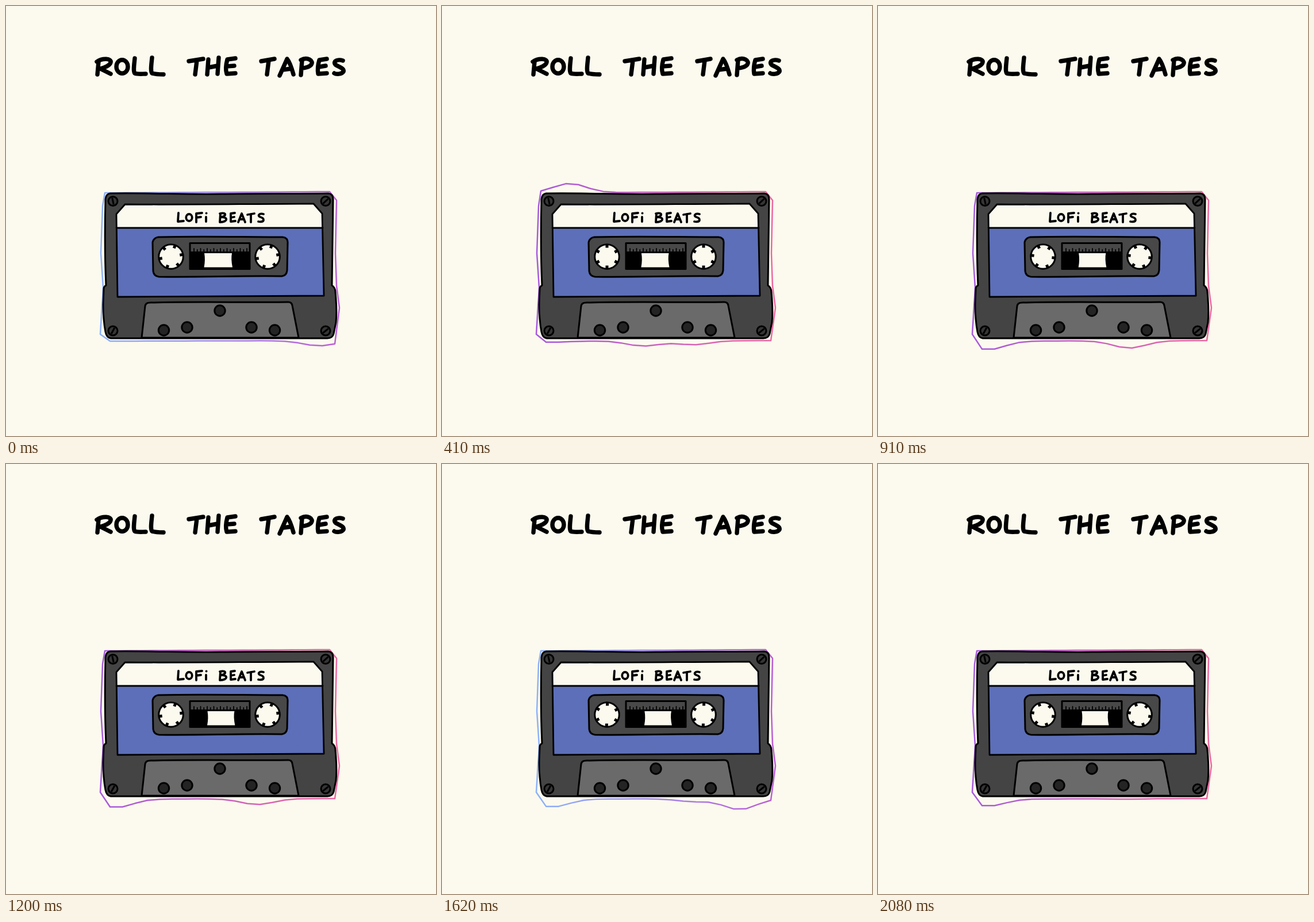
Write an HTML page that moves like this. It is 748x748 px and loops after 2.18 s.

```html
<!DOCTYPE html>
<html lang="en">
<head>
<meta charset="utf-8">
<title>Roll the tapes</title>
<style>
html, body { margin: 0; width: 100%; height: 100%; overflow: hidden; background: #fcfaee; }
svg { display: block; width: 100%; height: 100%; }
.ink { fill: none; stroke: #000; stroke-linecap: round; stroke-linejoin: round; }
.part { stroke: #000; stroke-width: 3; stroke-linejoin: round; }
.cream { fill: #fcfaee; }
</style>
</head>
<body>
<svg viewBox="0 0 748 748">
  <defs>
    <linearGradient id="glow" gradientUnits="userSpaceOnUse" x1="164" x2="580">
      <stop id="glowL"/>
      <stop id="glowR" offset="1"/>
    </linearGradient>
  </defs>

  <g class="ink" stroke-width="7.4" role="img" aria-label="ROLL THE TAPES">
    <path d="M161 97L159 119M158 97C168 90 184 91 182 98C181 103 172 107 164 109L182 118"/>
    <ellipse cx="202" cy="105.5" rx="10" ry="11.8"/>
    <path d="M224 91C223 102 221 113 224 117C229 119 237 118 243 118"/>
    <path d="M254 90C253 101 251 113 254 117C260 119 268 119 274 119"/>
    <path d="M318 96L343 92M332 95L329 119"/>
    <path d="M352 93L350 119M370 90L368 118M352 107L368 104"/>
    <path d="M399 91L385 93C382 104 382 112 384 118L399 117M384 105L397 104"/>
    <path d="M444 96L467 92M457 95L454 119"/>
    <path d="M476 121L489 92C494 98 497 108 500 119M481 111L496 109"/>
    <path d="M515 94L513 120M513 94C524 88 536 95 531 102C528 106 520 108 515 108"/>
    <path d="M558 92L545 94C542 104 542 112 543 118L558 117M544 106L556 104"/>
    <path d="M586 95C577 92 568 96 573 102C578 106 589 108 587 114C584 119 574 119 571 117"/>
  </g>

  <path id="wave" fill="none" stroke="url(#glow)" stroke-width="2.5" stroke-linejoin="round"/>

  <path class="part" fill="#444" d="M181 326C250 325 310 328 372 327C440 326 500 327 561 326Q569 327 569 336L567 486Q573 490 573 498Q576 530 574 550L570 570Q568 578 559 578L182 578Q175 577 173 567Q169 545 169 520L170 492Q170 488 174 486Q171 420 173 336Q174 327 181 326Z"/>
  <g id="screws" class="part" fill="#353535"></g>

  <path fill="#5c6fb8" d="M192 386L550 386L553 505L194 506Z"/>
  <path class="cream" d="M207 345L535 344L550 361L551 386L192 386L192 362Z"/>
  <path class="ink" stroke-width="2.8" d="M207 345C310 346 430 344 535 344L550 361L553 504C430 504 310 505 194 506L192 362ZM192 386L551 386"/>

  <g class="ink" stroke-width="3.8" role="img" aria-label="LOFi BEATS">
    <path d="M300 360L299 375L309 374"/>
    <ellipse cx="318.500" cy="368" rx="5.2" ry="6"/>
    <path d="M341 360L331 361L331 376M331 368L339 367M348 367L348 375M348.500 360.500h.1"/>
    <path d="M373 361L372 376M372 361C384 358 384 366 374 367C387 367 386 376 372 376"/>
    <path d="M398 360L391 361L391 375L399 374M391 368L397 367"/>
    <path d="M404 376L410 361L416 376M406 371L414 371"/>
    <path d="M420 363L432 361M426 362L426 376"/>
    <path d="M448 362C440 360 437 365 442 367C451 369 450 377 439 375"/>
  </g>

  <path class="part" fill="#484848" d="M265 402C340 400 410 402 481 402Q490 403 490 411L489 460Q488 469 480 470C400 469 340 472 266 471Q257 470 256 461L255 411Q257 403 265 402Z"/>
  <rect class="part" fill="#484848" x="320" y="412.5" width="104" height="45"/>
  <path d="M320 427H424V458H320Z"/>
  <path id="ticks" class="ink" stroke-width="1.8"/>
  <path id="gap" class="cream"/>
  <g id="reels"></g>

  <path class="part" fill="#6a6a6a" d="M236 577L242 522Q243 516 250 516C330 514 420 516 491 515Q497 515 498 521L509 577Z"/>
  <g id="holes" class="part" fill="#242424"></g>
</svg>
<script>
const el = id => document.getElementById(id);
const at = (x, y, body) => `<g transform="translate(${x} ${y})">${body}</g>`;
const clamp = v => Math.max(0, Math.min(1, v));
const smooth = v => v * v * (3 - 2 * v);
const mix = (a, b, p) => a + (b - a) * p;

const LOOP = 2180, FPS = 24, LAST = 50;

// Fixed parts, laid out around the middle of the cassette.
const MID = 371;
const screw = (side, y, angle) => at(MID + side * 185, y,
  `<circle r="8"/><path d="M-6 0H6" transform="rotate(${angle})"/>`);
el('screws').innerHTML = screw(-1, 339.5, 78) + screw(1, 339.5, -42) + screw(-1, 565, -62) + screw(1, 565, -38);

const hole = (dx, y) => at(MID + dx, y, '<circle r="9.2"/>');
el('holes').innerHTML = hole(1, 530) + [-1, 1].map(s => hole(s * 96.5, 564) + hole(s * 56, 559)).join('');

let teeth = '';
for (let a = 0; a < 360; a += 60)
  teeth += `<rect x="15.5" y="-2.5" width="5.5" height="5" transform="rotate(${a})"/>`;
el('reels').innerHTML = [-84, 84].map(dx =>
  at(MID + dx, 436, `<circle class="part cream" r="21.3"/><g class="teeth">${teeth}</g>`)).join('');
const wheels = document.querySelectorAll('.teeth');

let marks = '';
for (let i = 0; i <= 16; i++) marks += `M${327 + i * 5.75} 428V${i % 2 ? 424 : 422}`;
el('ticks').setAttribute('d', marks);

// Glowing outline: corners at rest, with the long edges cut into short pieces.
const CORNERS = [
  [172, 325], [563, 323], [575, 338], [573, 430], [575, 487], [580, 525],
  [572, 582], [181, 583], [164, 571], [169, 490], [165, 430], [168, 348]
];
const RIM = CORNERS.flatMap(([x, y], i) => {
  const [nx, ny] = CORNERS[(i + 1) % CORNERS.length];
  const cuts = Math.ceil(Math.abs(nx - x) / 22);
  return Array.from({ length: cuts }, (_, j) => [mix(x, nx, j / cuts), mix(y, ny, j / cuts)]);
});

// Swells on the top (-1) and bottom (1) edge, each rising to a peak and fading.
const SWELLS = [
  { edge: 1, x: 545, high: 9, peak: 0, rise: 1, fall: 8 },
  { edge: 1, x: 350, high: 9, peak: 10, rise: 8, fall: 5 },
  { edge: -1, x: 222, high: 18, peak: 12, rise: 10, fall: 9 },
  { edge: 1, x: 437, high: 14, peak: 15, rise: 10, fall: 40 },
  { edge: 1, x: 192, high: 15, peak: 17, rise: 9, fall: 120 },
  { edge: 1, x: 518, high: 19, peak: 39, rise: 9, fall: 10 }
];
const SPREAD = 28;
const edgeOf = y => y > 580 ? 1 : y < 330 ? -1 : 0;

function push(x, y, k) {
  let d = 0;
  for (const s of SWELLS) {
    if (s.edge !== edgeOf(y)) continue;
    const level = smooth(clamp(1 - (k < s.peak ? (s.peak - k) / s.rise : (k - s.peak) / s.fall)));
    d += s.edge * s.high * level * Math.exp(-(((x - s.x) / SPREAD) ** 2) / 2);
  }
  return d;
}

const blend = (a, b, p) => `rgb(${a.map((v, i) => Math.round(mix(v, b[i], p)))})`;

function drawWave(k) {
  const points = RIM.map(([x, y]) => [x, y + push(x, y, k)]);
  el('wave').setAttribute('d', 'M' + points.join('L') + 'Z');
  const cool = Math.max(0, Math.cos(2 * Math.PI * k / 39));
  el('glowL').setAttribute('stop-color', blend([166, 90, 222], [140, 178, 250], cool));
  el('glowR').setAttribute('stop-color', blend([238, 104, 160], [188, 92, 214], cool));
}

function draw(k) {
  const l = 345 + k * 0.19, r = 393 + k * 0.15;
  el('gap').setAttribute('d', `M${l} 430H${r}Q${r - 2} 440 ${r + 1} 454.5H${l - 0.5}Q${l + 2} 442 ${l} 430Z`);
  wheels.forEach(w => w.setAttribute('transform', `rotate(${50 - 2 * k})`));
  drawWave(k);
}

// Steps begin on whole hundredths of a second.
const startOf = k => Math.floor(k * 100 / FPS) * 10;

function tick() {
  const t = performance.now() % LOOP;
  let k = LAST;
  while (startOf(k) > t) k--;
  draw(k);
  requestAnimationFrame(tick);
}
tick();
</script>
</body>
</html>
```
